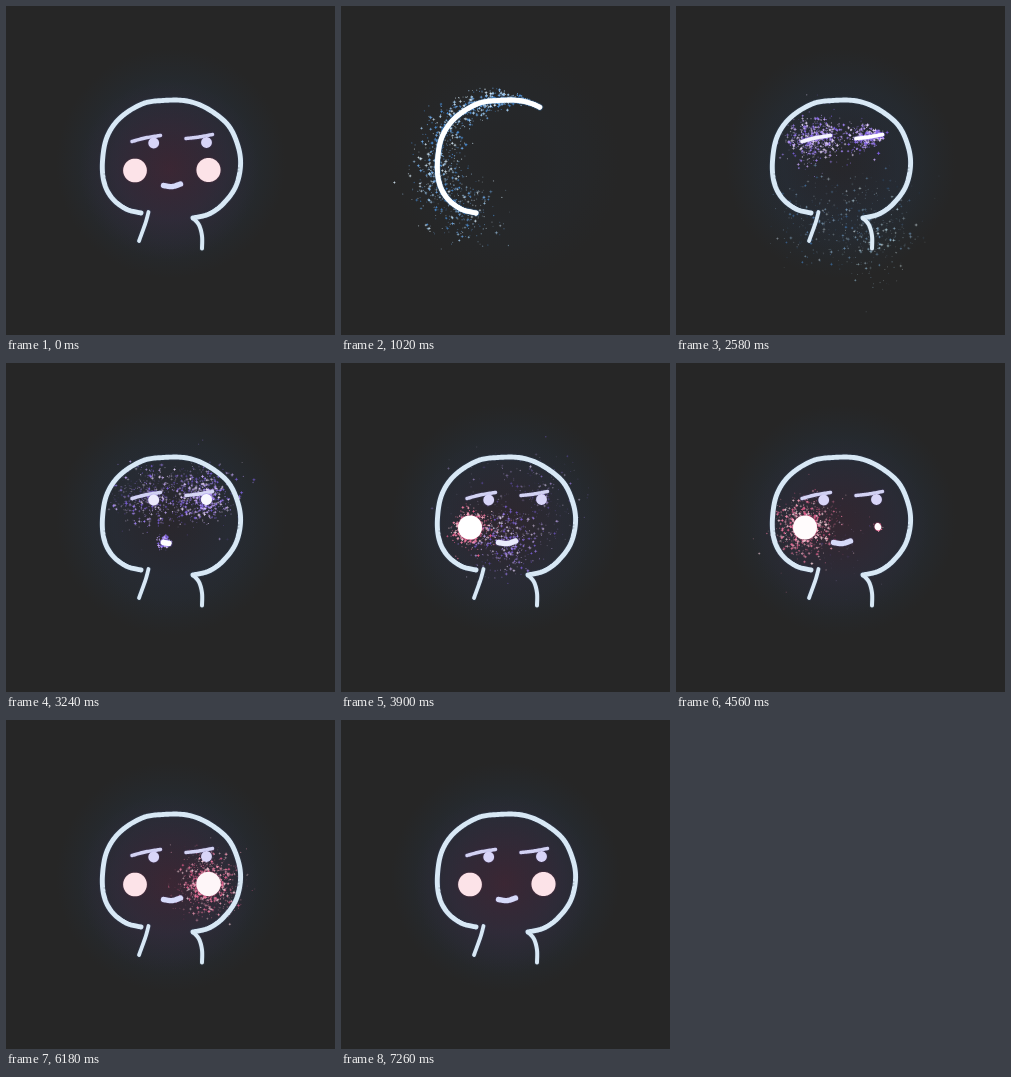
Animation, 329 px wide and 329 px high, one loop 7.56 s. Source, as an HTML page with a canvas:

```html
<!DOCTYPE html>
<html lang="en">
<head>
<meta charset="utf-8">
<title>Sparkle drawing</title>
<style>
  html, body { margin: 0; width: 100%; height: 100%; overflow: hidden; background: #262626; }
  canvas { display: block; width: 100vmin; height: 100vmin; }
</style>
</head>
<body>
<canvas id="stage"></canvas>
<script>
const SIZE = 329, LOOP = 7560, STEP = 60, BLANK_AT = 60, LAST = 7260;
const canvas = document.getElementById('stage');
const ctx = canvas.getContext('2d');
const ratio = Math.max(1, window.devicePixelRatio || 1);
canvas.width = canvas.height = SIZE * ratio;

const clamp = v => Math.max(0, Math.min(1, v));
const ramp = (t, a, b) => clamp((t - a) / (b - a));

function seeded(seed) {
  return () => {
    seed = (seed + 0x6D2B79F5) | 0;
    let x = Math.imul(seed ^ (seed >>> 15), 1 | seed);
    x = (x + Math.imul(x ^ (x >>> 7), 61 | x)) ^ x;
    return ((x ^ (x >>> 14)) >>> 0) / 4294967296;
  };
}
const rnd = seeded(41);

// Catmull-Rom curve through the given points, sampled densely
function curve(...p) {
  const out = [];
  const at = i => p[Math.max(0, Math.min(p.length - 1, i))];
  for (let i = 0; i < p.length - 1; i++) {
    const [a, b, c, d] = [at(i - 1), at(i), at(i + 1), at(i + 2)];
    for (let k = 0; k < 14; k++) {
      const u = k / 14;
      out.push([0, 1].map(j => 0.5 * (2 * b[j] + (c[j] - a[j]) * u
        + (2 * a[j] - 5 * b[j] + 4 * c[j] - d[j]) * u * u
        + (3 * b[j] - a[j] - 3 * c[j] + d[j]) * u * u * u)));
    }
  }
  out.push(p[p.length - 1]);
  return out;
}

function spiral(cx, cy, r, turns) {
  const n = turns * 30, out = [];
  for (let i = 0; i <= n; i++) {
    const a = i / 30 * Math.PI * 2;
    const q = r * Math.min(1, i / (n - 30));
    out.push([cx + q * Math.cos(a), cy + q * Math.sin(a)]);
  }
  return out;
}

const BLUE = ['#4a8fd8', '#6fa9e6', '#a3cdf0', '#d8ecfa'];
const ICE = ['#78a4cc', '#9cc4de', '#bcdcea', '#def0f6'];
const VIOLET = ['#8264e8', '#a486f8', '#c6aaf8', '#e8d8fc'];
const PINK = ['#e8608f', '#fa7ea6', '#fca4be', '#fcd4de'];

const part = (pts, width, color, start, end, stop, cool, tones, count, spread) =>
  ({ pts, width, color, start, end, stop, cool, tones, count, spread });

const parts = [
  part(curve([135, 207], [120, 203], [106, 192], [98, 176], [96.5, 155], [101, 131], [114, 112],
    [136, 98], [157, 94.5], [181, 95], [202, 103], [222, 119], [232, 140], [234.5, 160],
    [229.5, 181], [217, 198], [203, 208], [187, 212]),
    4.9, '#d8e8f5', 360, 1500, 1500, 2400, BLUE, 1900, 46),
  part(curve([142.5, 206], [139.5, 217], [133, 235]), 3.8, '#d8e8f5', 1500, 1610, 1640, 2500, BLUE, 300, 46),
  part(curve([187, 212], [193, 219], [196, 230], [196, 242.5]),
    4, '#d8e8f5', 1610, 1790, 1830, 2700, ICE, 330, 52),
  part(curve([126, 135.5], [139, 132], [154.5, 129.5]), 3.5, '#d2d2f3', 1920, 2220, 2400, 3100, VIOLET, 620, 34),
  part(curve([180, 132.5], [193, 131], [206.5, 128.5]), 3.5, '#d2d2f3', 2280, 2580, 2640, 3300, VIOLET, 480, 34),
  part(spiral(147.7, 137, 3.3, 3), 4.2, '#d8d5f8', 2640, 2850, 2880, 3600, VIOLET, 260, 50),
  part(spiral(200.5, 136.5, 3.3, 3), 4.2, '#d8d5f8', 2880, 3090, 3120, 3800, VIOLET, 280, 50),
  part(curve([157.5, 179.5], [166, 180.6], [174.5, 178]), 5.4, '#d6daf9', 3150, 3420, 3450, 4300, VIOLET, 400, 42),
  part(spiral(129, 164.5, 9.4, 5), 5, '#fce3e8', 3480, 3840, 4440, 5300, PINK, 1050, 36),
  part(spiral(202.5, 164, 9.6, 5), 5, '#fce3e8', 4500, 4950, 5940, 6700, PINK, 1600, 36)
];

const sparks = parts.flatMap(p => Array.from({ length: p.count }, () => {
  const birth = p.start + rnd() * (p.stop - p.start);
  const i = Math.floor(ramp(birth, p.start, p.end) * (p.pts.length - 1));
  const anywhere = birth > p.end;
  const [x, y] = p.pts[anywhere ? Math.floor(rnd() * p.pts.length) : i];
  const reach = 4 + p.spread * Math.pow(rnd(), 1.1) + (rnd() < 0.07 ? 38 * rnd() : 0);
  const r = 0.5 + 0.65 * rnd() * rnd();
  return {
    x, y, birth, reach, r,
    angle: rnd() * Math.PI * 2,
    life: 800 + 500 * rnd(),
    tone: p.tones[Math.floor(rnd() * 4)],
    phase: rnd() * 6.28,
    star: r > 0.72
  };
}));

function glow(x, y, radius, stops) {
  const g = ctx.createRadialGradient(x, y, 0, x, y, radius);
  stops.forEach(([at, color]) => g.addColorStop(at, color));
  ctx.fillStyle = g;
  ctx.fillRect(0, 0, SIZE, SIZE);
}

function trace(pts, amount) {
  const end = amount * (pts.length - 1), n = Math.floor(end), f = end - n;
  ctx.beginPath();
  ctx.moveTo(...pts[0]);
  for (let i = 1; i <= n; i++) ctx.lineTo(...pts[i]);
  if (f > 0) {
    const [a, b] = [pts[n], pts[n + 1]];
    ctx.lineTo(a[0] + (b[0] - a[0]) * f, a[1] + (b[1] - a[1]) * f);
  }
}

function drawPart(p, t) {
  if (t <= p.start) return;
  const heat = 1 - ramp(t, p.stop, p.cool);
  trace(p.pts, ramp(t, p.start, p.end));
  ctx.lineWidth = p.width + 2;
  ctx.strokeStyle = p.tones[0];
  ctx.globalAlpha = 0.08 + 0.25 * heat;
  ctx.stroke();
  ctx.globalAlpha = 1;
  ctx.lineWidth = p.width;
  ctx.strokeStyle = p.color;
  ctx.stroke();
  ctx.globalAlpha = heat;
  ctx.strokeStyle = '#fff';
  ctx.stroke();
  ctx.globalAlpha = 1;
}

function drawSpark(s, t) {
  const age = t - s.birth;
  if (age < 0 || age > s.life) return;
  const d = s.reach * (1 - Math.exp(-age / 420));
  const x = s.x + d * Math.cos(s.angle), y = s.y + d * Math.sin(s.angle);
  const fade = Math.pow(1 - age / s.life, 0.65);
  ctx.globalAlpha = fade * (0.8 + 0.2 * Math.sin(s.phase + t / 90));
  ctx.fillStyle = s.tone;
  ctx.beginPath();
  ctx.arc(x, y, s.r, 0, 7);
  ctx.fill();
  if (s.star) {
    const arm = s.r * 1.7;
    ctx.fillRect(x - arm, y - 0.35, arm * 2, 0.7);
    ctx.fillRect(x - 0.35, y - arm, 0.7, arm * 2);
  }
}

function draw(t) {
  ctx.setTransform(ratio, 0, 0, ratio, 0, 0);
  ctx.globalAlpha = 1;
  ctx.fillStyle = '#262626';
  ctx.fillRect(0, 0, SIZE, SIZE);
  ctx.lineCap = ctx.lineJoin = 'round';

  ctx.globalAlpha = ramp(t, 360, 2400);
  glow(165, 157, 115, [[0, 'rgba(32,42,58,.2)'], [0.5, 'rgba(36,52,72,.36)'],
    [0.7, 'rgba(36,52,70,.28)'], [1, 'rgba(36,50,66,0)']]);
  ctx.globalAlpha = 0.25 * ramp(t, 2000, 3400) + 0.4 * ramp(t, 3480, 4300) + 0.35 * ramp(t, 4500, 5600);
  glow(163, 164, 90, [[0, 'rgba(92,38,66,.4)'], [0.5, 'rgba(80,42,74,.27)'], [1, 'rgba(70,44,80,0)']]);
  ctx.globalAlpha = 1;

  sparks.forEach(s => drawSpark(s, t));
  ctx.globalAlpha = 1;
  parts.forEach(p => drawPart(p, t));
}

let shown = -1;
function tick(now) {
  const step = Math.floor((now % LOOP) / STEP) * STEP;
  const t = step < BLANK_AT ? LAST : Math.min(step, LAST);
  if (t !== shown) draw(shown = t);
  requestAnimationFrame(tick);
}
draw(LAST);
requestAnimationFrame(tick);
</script>
</body>
</html>
```
